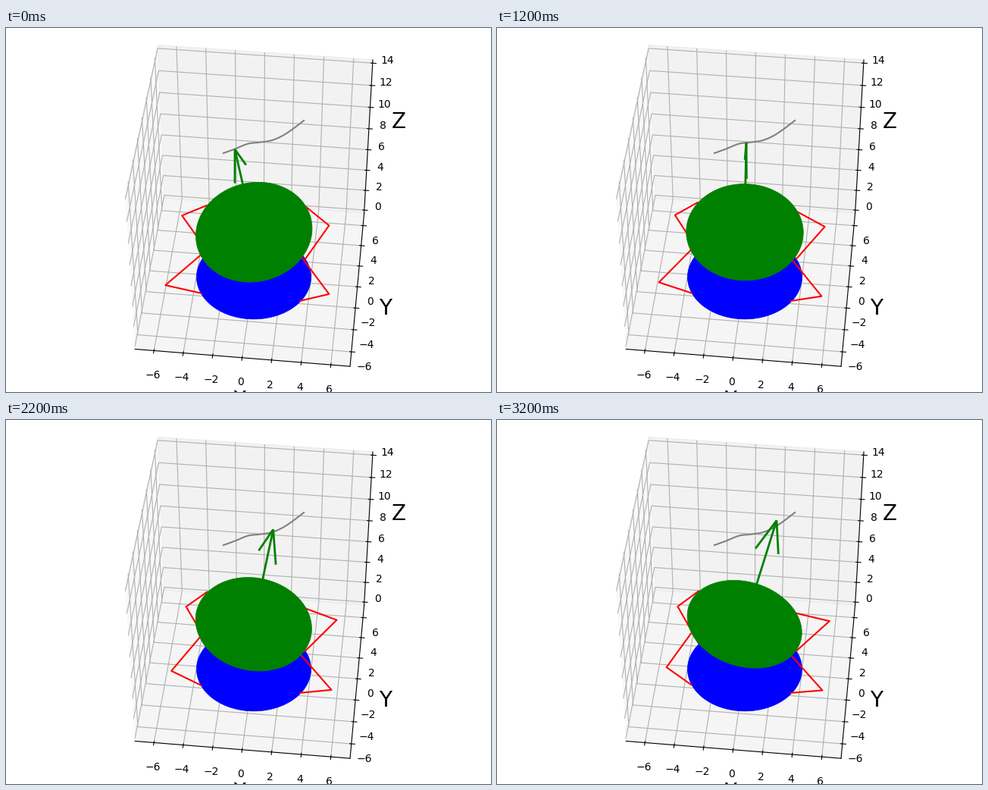
Write a matplotlib script that moves like this. It is 640 px wide and 480 px high and loops after 4100 ms.

```python
import numpy as np
import matplotlib.pyplot as plt
from matplotlib.animation import FuncAnimation
from mpl_toolkits.mplot3d.art3d import Poly3DCollection

FRAMES, LAST, INTERVAL = 41, 32, 100
RADIUS, HEIGHT, ARM, REACH = 4, 4.5, 3.2, 10
LEGS = np.radians([30, 150, 210, 330])
CENTER = np.array([0, 0, HEIGHT])
UP = np.array([0, 0, 1])


def smooth(x, xs, ys):
    """Cubic Hermite curve through the knots."""
    xs, ys = np.asarray(xs, float), np.asarray(ys, float)
    slope = np.gradient(ys, xs)
    k = np.clip(np.searchsorted(xs, x, side="right") - 1, 0, len(xs) - 2)
    h = xs[k + 1] - xs[k]
    t = (x - xs[k]) / h
    return ((1 + 2 * t) * (1 - t) ** 2 * ys[k] + t * (1 - t) ** 2 * h * slope[k]
            + t * t * (3 - 2 * t) * ys[k + 1] + t * t * (t - 1) * h * slope[k + 1])


def ring(angles):
    return np.column_stack([np.cos(angles), np.sin(angles), 0 * angles])


# Tilt of the platform normal along the motion
KNOTS = [0, 4, 8, 15, 19, 25, 32]
TILT_X = [-0.0958, -0.0545, -0.0129, 0.0628, 0.1094, 0.1649, 0.2101]
TILT_Y = [-0.2261, -0.2022, -0.1792, -0.1557, -0.1322, -0.0742, -0.0052]


def normal(step):
    nx, ny = smooth(step, KNOTS, TILT_X), smooth(step, KNOTS, TILT_Y)
    return np.array([nx, ny, np.sqrt(1 - nx * nx - ny * ny)])


def tilt(points, n):
    """Shortest rotation taking the vertical to n, for flat points."""
    return points - np.outer(points @ n / (1 + n[2]), n + UP)


def leg_points(direction, n):
    base = RADIUS * direction
    top = CENTER + tilt(base[None], n)[0]
    d = top - base
    out = direction - (direction @ d) / (d @ d) * d
    out /= np.linalg.norm(out)
    elbow = (base + top) / 2 + np.sqrt(ARM ** 2 - d @ d / 4) * out
    return np.array([base, elbow, top])


fig = plt.figure(figsize=(6.4, 4.8), dpi=100)
ax = fig.add_axes([0, 0, 1, 1], projection="3d", computed_zorder=False)
ax.set_box_aspect((1, 1, 1))
ax.view_init(elev=45, azim=-84)

pad = 14 / 48
ax.set(xlim=(-7 - pad, 7 + pad), ylim=(-7 - pad, 7 + pad), zlim=(-pad, 14 + pad),
       xticks=range(-6, 7, 2), yticks=range(-6, 7, 2), zticks=range(0, 15, 2))
ax.set_xlabel("X", fontsize=20)
ax.set_ylabel("Y", fontsize=20)
ax.set_zlabel("Z", fontsize=20)

PATH_X = [-1.667, -0.986, -0.168, 0.547, 1.352, 1.945, 2.523, 3.185]
PATH_Y = [-2.484, -2.022, -1.435, -1.232, -0.932, -0.459, 0.218, 1.128]
xs = np.linspace(PATH_X[0], PATH_X[-1], 100)
ax.plot(xs, smooth(xs, PATH_X, PATH_Y), 14, color="gray", lw=1.5, zorder=2)

disc = RADIUS * ring(np.linspace(0, 2 * np.pi, 120, endpoint=False))


def add_plate(color, zorder):
    plate = Poly3DCollection([disc], facecolor=color, edgecolor=color,
                             linewidth=0.5, zorder=zorder)
    ax.add_collection3d(plate)
    return plate


add_plate("blue", 1)
platform = add_plate("green", 4)
directions = ring(LEGS)
legs = [ax.plot([], [], [], color="red", lw=1.5, zorder=3)[0] for _ in directions]
arrows = []


def update(i):
    n = normal(min(i, LAST))
    platform.set_verts([CENTER + tilt(disc, n)])
    for line, direction in zip(legs, directions):
        line.set_data_3d(*leg_points(direction, n).T)
    while arrows:
        arrows.pop().remove()
    arrows.append(ax.quiver(*CENTER, *n, length=REACH, color="green", lw=2, zorder=5))
    return [platform, *legs, *arrows]


anim = FuncAnimation(fig, update, frames=FRAMES, interval=INTERVAL,
                     repeat=True, repeat_delay=0, blit=False)
plt.show()
```
